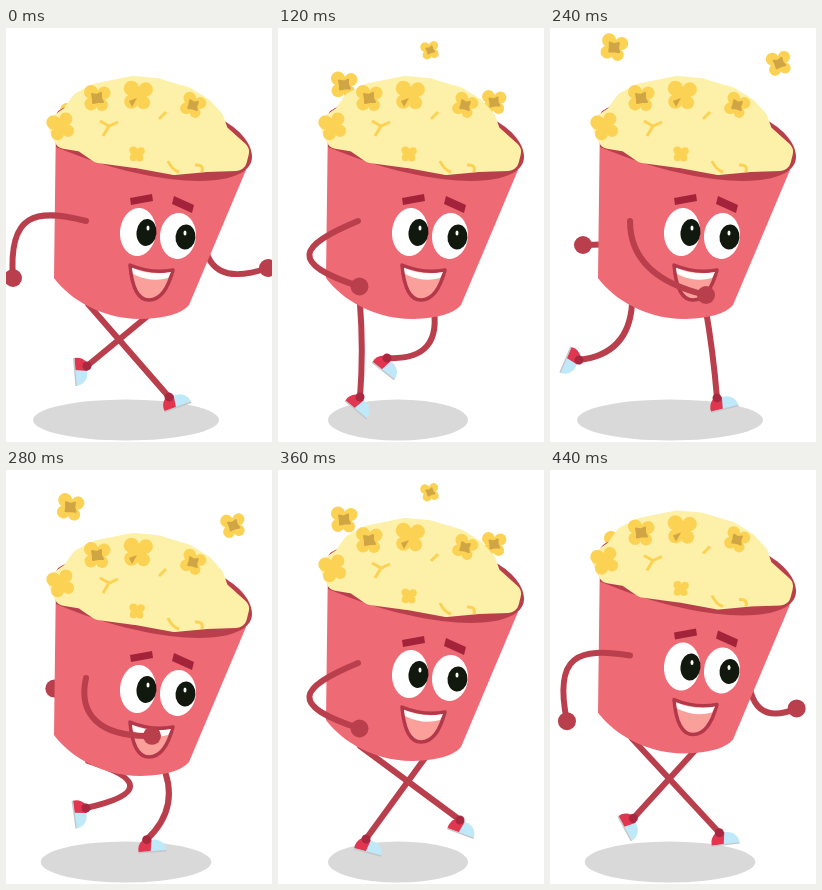
Animation of 266x414 px, one loop 0.48 s. Source, as an HTML page:

```html
<!DOCTYPE html>
<html lang="en">
<head>
<meta charset="utf-8">
<title>Running popcorn</title>
<style>
  html, body { margin: 0; width: 100%; height: 100%; overflow: hidden; background: #fff; }
  svg { display: block; width: 266px; height: 414px; }
  .limb { fill: none; stroke: #b93f4d; stroke-width: 6; stroke-linecap: round; }
  .dark { fill: #b93f4d; }
</style>
</head>
<body>
<svg viewBox="0 0 266 414">
  <defs>
    <g id="petals" fill="#fbd253">
      <circle r="8"/>
      <circle cx="-6" cy="-6" r="7"/><circle cx="7" cy="-5" r="6.5"/>
      <circle cx="5" cy="7" r="6"/><circle cx="-6" cy="6" r="6.5"/>
    </g>
    <g id="kernel">
      <use href="#petals"/>
      <path d="M-5-4L0-3L4-5L4 0L6 4L1 4L-4 5L-4 1Z" fill="#d0a545" stroke="#d0a545" stroke-width="2" stroke-linejoin="round"/>
    </g>
    <g id="shoe">
      <path d="M2 1C12-2 19 5 19 12H1Z" fill="#bfe9f8"/>
      <path d="M5 0H-4Q-10 5-9 12H3Z" fill="#e0364f"/>
      <path d="M-9 12.5H19" stroke="#c4c6c8" stroke-width="1.5"/>
      <circle r="4.5" fill="#a8293f"/>
    </g>
  </defs>

  <ellipse id="shadow" cx="120" cy="392" ry="20.5" fill="#d9d9d9"/>
  <path id="legA" class="limb"/><use id="shoeA" href="#shoe"/>
  <path id="legB" class="limb"/><use id="shoeB" href="#shoe"/>
  <path id="backArm" class="limb"/><circle id="backHand" r="9" class="dark"/>
  <use id="popLeft" href="#kernel"/>
  <use id="popMid" href="#kernel"/>
  <use id="popRight" href="#kernel"/>

  <g id="body">
    <path d="M50 90L48 250C58 264 88 291 135 291Q172 290 183 277L240 142Z" fill="#ee6a74"/>
    <path class="dark" d="M50 119V88Q50 82 62 78L208 88C232 98 246 115 246 129C246 160 160 165 50 119Z"/>
    <path fill="#fdf0a8" stroke="#fdf0a8" stroke-width="22" stroke-linejoin="round"
      d="M53 97L59 110L77 113L93 124L130 129L168 136L200 133L230 132L232 124L212 106L207 92L196 80L180 70L150 61L127 59L92 66L76 74L66 88Z"/>
    <path d="M94 93L103 98L112 94M103 98L97 108M153 91L160 84M162 133Q166 142 173 144M189 137Q198 136 196 144" fill="none" stroke="#fbd253" stroke-width="3"/>
    <use href="#kernel" transform="translate(91 70)"/>
    <use href="#petals" transform="translate(132 67) scale(1.1)"/>
    <path d="M123 73L131 70L126 79Z" fill="#d0a545"/>
    <use href="#kernel" transform="translate(187 77) rotate(20) scale(.9)"/>
    <use href="#petals" transform="translate(55 98) rotate(-20)"/>
    <use href="#petals" transform="translate(131 126) scale(.58)"/>

    <path d="M124 170L146 166L147 173L125 177ZM168 168L188 177L186 185L166 176Z" fill="#a3243a"/>
    <g fill="#fff">
      <ellipse rx="18" ry="24" transform="translate(132 204) rotate(5)"/>
      <ellipse rx="18" ry="23" transform="translate(172 208) rotate(5)"/>
    </g>
    <g fill="#11180d">
      <ellipse rx="10" ry="13.500" transform="translate(140.500 204.500) rotate(6)"/>
      <ellipse rx="10" ry="12.500" transform="translate(179.500 209) rotate(6)"/>
    </g>
    <g fill="#fff"><ellipse cx="142" cy="200" rx="1.500" ry="2.500"/><ellipse cx="179" cy="205" rx="1.500" ry="2.500"/></g>
    <path id="mouth" d="M124 237Q145 246 167 242Q159 272 143 272Q127 272 124 237Z" fill="#fb9f9a" stroke="#b2384a" stroke-width="3.500" stroke-linejoin="round"/>
    <path d="M126 240Q146 248 165 244L162 250Q145 255 127 246Z" fill="#fff"/>
  </g>
  <path id="frontArm" class="limb"/><circle id="frontHand" r="9" class="dark"/>
</svg>
<script>
const STEP = 40, STEPS = 12, LEG_LENGTH = 95;
const set = (id, attrs) => {
  for (const name in attrs) document.getElementById(id).setAttribute(name, attrs[name]);
};

// Ankle x, y and shoe angle at each quarter of the run cycle.
const strideA = [[163, 369, -20], [82, 369, 40], [29, 332, 113], [182, 350, 20]];
const strideB = [[81, 338, 85], [109, 330, 38], [167, 370, -14], [88, 369, 15]];
// Front arm curve handles with the arm back, in the middle and forward.
const armBend = [[30, 180, 2, 185], [20, 218, 10, 235], [80, 230, 105, 255]];

function blend(poses, position) {
  const i = Math.floor(position), next = poses[(i + 1) % poses.length];
  return poses[i].map((v, j) => v + (next[j] - v) * (position - i));
}

// The knee bends forward by whatever length the leg has to spare.
function drawLeg(name, stride, hipX, hipY, step) {
  const [x, y, angle] = blend(stride, step / 3);
  const dx = x - hipX, dy = y - hipY, reach = Math.hypot(dx, dy);
  const bend = 1.8 * Math.max(0, LEG_LENGTH - reach) / reach;
  const kneeX = hipX + dx / 2 + dy * bend, kneeY = hipY + dy / 2 - dx * bend;
  set('leg' + name, { d: `M${hipX} ${hipY}Q${kneeX} ${kneeY} ${x} ${y}` });
  set('shoe' + name, { transform: `translate(${x} ${y}) rotate(${angle})` });
}

function drawArm(name, start, curve, x, y) {
  set(name + 'Arm', { d: `M${start}${curve} ${x} ${y}` });
  set(name + 'Hand', { cx: x, cy: y });
}

function place(id, x, y, angle, size) {
  set(id, { transform: `translate(${x} ${y}) rotate(${angle}) scale(${size})` });
}

function draw(step) {
  const half = step % 6, beat = step % 3;
  const lift = beat && (half < 3 ? 7.5 : -7.5) * (3 - beat);
  const wave = peak => Math.cos((step - peak) * Math.PI / 6);
  const swing = wave(6);

  set('body', { transform: `translate(0 ${lift})` });
  set('shadow', { rx: 70 + 23 * Math.abs(1 - half / 3) });
  drawLeg('A', strideA, 82, 276 + lift, step);
  drawLeg('B', strideB, 155, 277 + lift, step);

  const [ax, ay, bx, by] = blend(armBend, swing + 1);
  drawArm('front', [80, 193 + lift], `C${ax} ${ay + lift} ${bx} ${by + lift}`, 81.5 + 74.5 * swing, 258.5 + 8.5 * swing);
  drawArm('back', [198, 205 + lift], `Q198 ${238 - 24 * swing}`, 147.5 - 114.5 * swing, 228.5 - 11.5 * swing);

  place('popLeft', 66 - 2 * swing, 53 - 34 * wave(6.2) + lift, 10 * swing, 1);
  place('popRight', 216 + 13 * swing, 74 - 39 * swing + lift, -15 * swing, 0.92);
  place('popMid', 152, 112 - 30 * half + lift, -15, 0.68);
}

function tick() {
  draw(Math.floor(performance.now() / STEP) % STEPS);
  requestAnimationFrame(tick);
}
tick();
</script>
</body>
</html>
```
